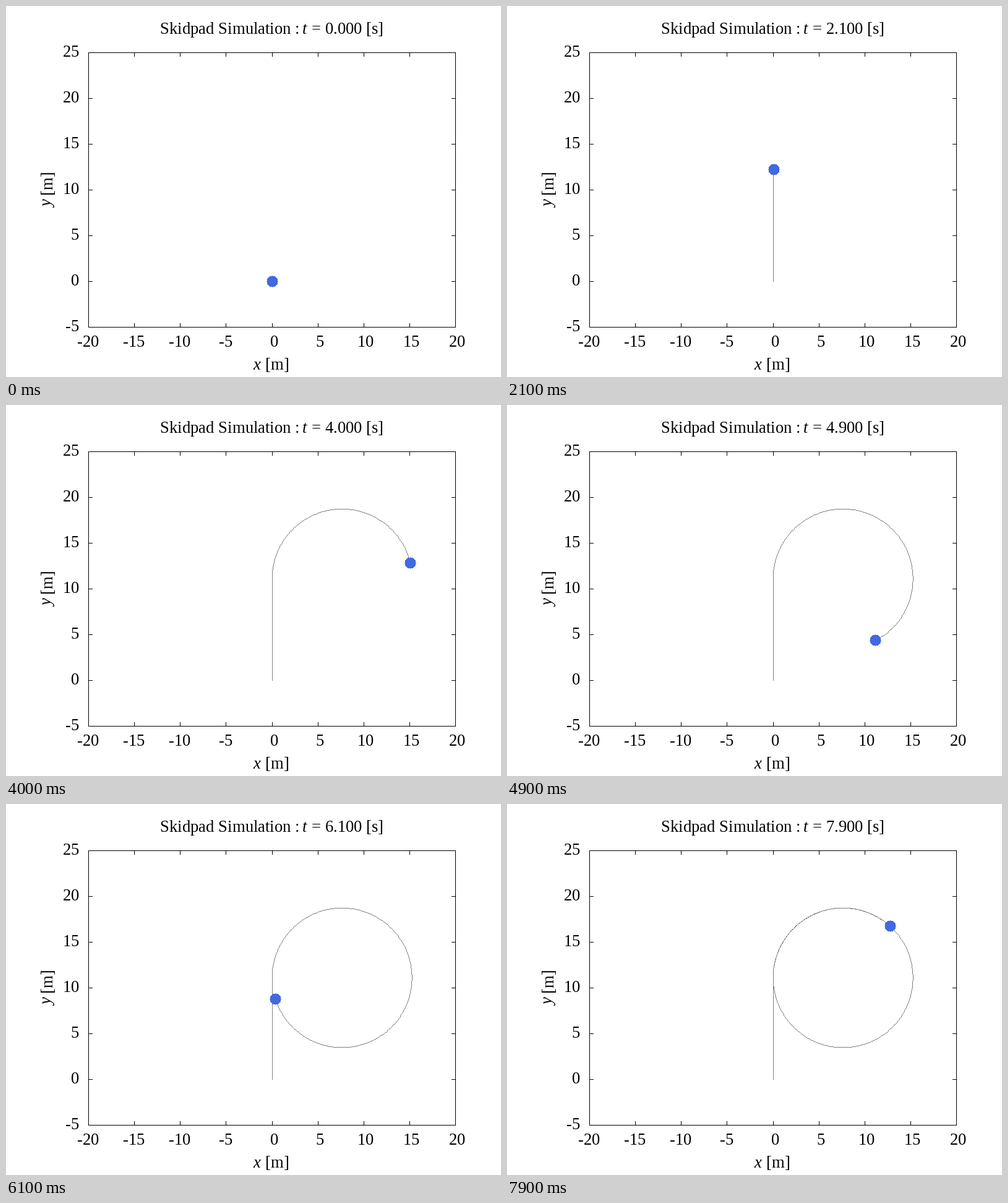
These frames come from a looping animation (800 px wide and 600 px high, 8 s). A matplotlib script:

```python
import numpy as np
import matplotlib.pyplot as plt
from matplotlib.animation import FuncAnimation

plt.rcParams["font.family"] = "Liberation Serif"

FRAMES, STEP = 80, 0.1          # frame count, seconds per frame
W, H = 800, 600
PT = 0.72                       # points per pixel at 100 dpi
LEFT, RIGHT, TOP, BOTTOM = 133, 726, 75, 519
TICK = 6
SPEED, RADIUS, T_TURN = 40 / 3.6, 15.25 / 2, 2.0
DT = 0.01
GRAY, BLUE = (128, 128, 128), (65, 105, 225)

fig = plt.figure(figsize=(8, 6), dpi=100, facecolor="white")
ax = fig.add_axes([0, 0, 1, 1])
ax.axis("off")
canvas = np.full((H, W, 3), 255, np.uint8)
picture = ax.imshow(canvas, extent=(0, W, H, 0), aspect="auto",
                    interpolation="nearest")
ax.set_xlim(0, W)
ax.set_ylim(H, 0)


def to_px(x, y):
    """Metres to whole stage pixels, as column and row."""
    col = np.floor(LEFT + (x + 20) * (RIGHT - LEFT) / 40 + 0.5)
    up = np.floor((y + 5) * (BOTTOM - TOP) / 30 + 0.5)
    return np.stack([col, BOTTOM - up], axis=-1).astype(int)


def position(t):
    """Constant acceleration on the straight, then a steady circle."""
    run = 0.5 * SPEED / T_TURN * np.minimum(t, T_TURN) ** 2
    turn = SPEED / RADIUS * np.maximum(t - T_TURN, 0)
    return RADIUS * (1 - np.cos(turn)), run + RADIUS * np.sin(turn)


def segment(p, q):
    """Pixels of a thin line from p to q."""
    n = max(abs(q - p).max(), 1)
    share = np.arange(n + 1)[:, None] / n
    return p + np.floor((q - p) * share + 0.5).astype(int)


def stroke(xs, ys):
    ax.plot(np.add(xs, 0.5), np.add(ys, 0.5), color="black", lw=PT,
            antialiased=False, snap=False, solid_capstyle="projecting")


def text(x, y, s, italic=False, angle=0):
    return ax.text(x, y, s, fontsize=20 * 96 / 72 * PT, color="black",
                   ha="left", va="baseline", rotation=angle,
                   rotation_mode="anchor",
                   style="italic" if italic else "normal")


def label(x, y, s, align=0.0, italic=False):
    """Set text glyph by glyph on whole pixels; align is the share left of x."""
    glyphs = [text(0, 0, c, italic) for c in s]
    steps = [round(g.get_window_extent().width) for g in glyphs]
    pen = np.floor(x - align * sum(steps))
    for glyph, step in zip(glyphs, steps):
        glyph.set_position((pen - 0.45, y))    # offset makes rounding settle
        glyph.set_visible(glyph.get_text() != " ")
        pen += step
    return glyphs


# Frame, ticks and tick labels
stroke([LEFT, RIGHT, RIGHT, LEFT, LEFT], [TOP, TOP, BOTTOM, BOTTOM, TOP])
for v in range(-20, 21, 5):
    x, _ = to_px(v, 0)
    stroke([x, x], [BOTTOM, BOTTOM - TICK])
    stroke([x, x], [TOP, TOP + TICK])
    label(x, 551, f"{v: d}", align=0.5)
for v in range(-5, 26, 5):
    _, y = to_px(0, v)
    stroke([LEFT, LEFT + TICK], [y, y])
    stroke([RIGHT, RIGHT - TICK], [y, y])
    label(118, y + 7, str(v), align=1)

# Axis names and title
label(400, 588, "x", italic=True)
label(419, 588, "[m]")
text(75, 326, "y", italic=True, angle=90)
text(74, 304, "[m]", angle=90)
label(249, 45, "Skidpad Simulation :")
label(479, 45, "t", italic=True)
clock = label(494, 45, "= 0.000 [s]")

# Trail pieces and the round marker
times = np.arange(int(round(FRAMES * STEP / DT)) + 1) * DT
path = to_px(*position(times))
pieces = [segment(p, q) for p, q in zip(path[:-1], path[1:])]
rows, cols = np.mgrid[-9:10, -9:10]
disc = rows ** 2 + cols ** 2 <= 81
disc_rows, disc_cols = rows[disc], cols[disc]


def draw(i):
    n = i * int(round(STEP / DT))
    canvas[:] = 255
    if n:
        trail = np.vstack(pieces[:n])
        canvas[trail[:, 1], trail[:, 0]] = GRAY
    col, row = path[n]
    canvas[row + disc_rows, col + disc_cols] = BLUE
    picture.set_data(canvas)
    for glyph, c in zip(clock, f"= {i * STEP:.3f} [s]"):
        glyph.set_text(c)
    return [picture, *clock]


anim = FuncAnimation(fig, draw, frames=FRAMES, init_func=lambda: draw(0),
                     interval=STEP * 1000, repeat=True, repeat_delay=0,
                     blit=False)
plt.show()
```
